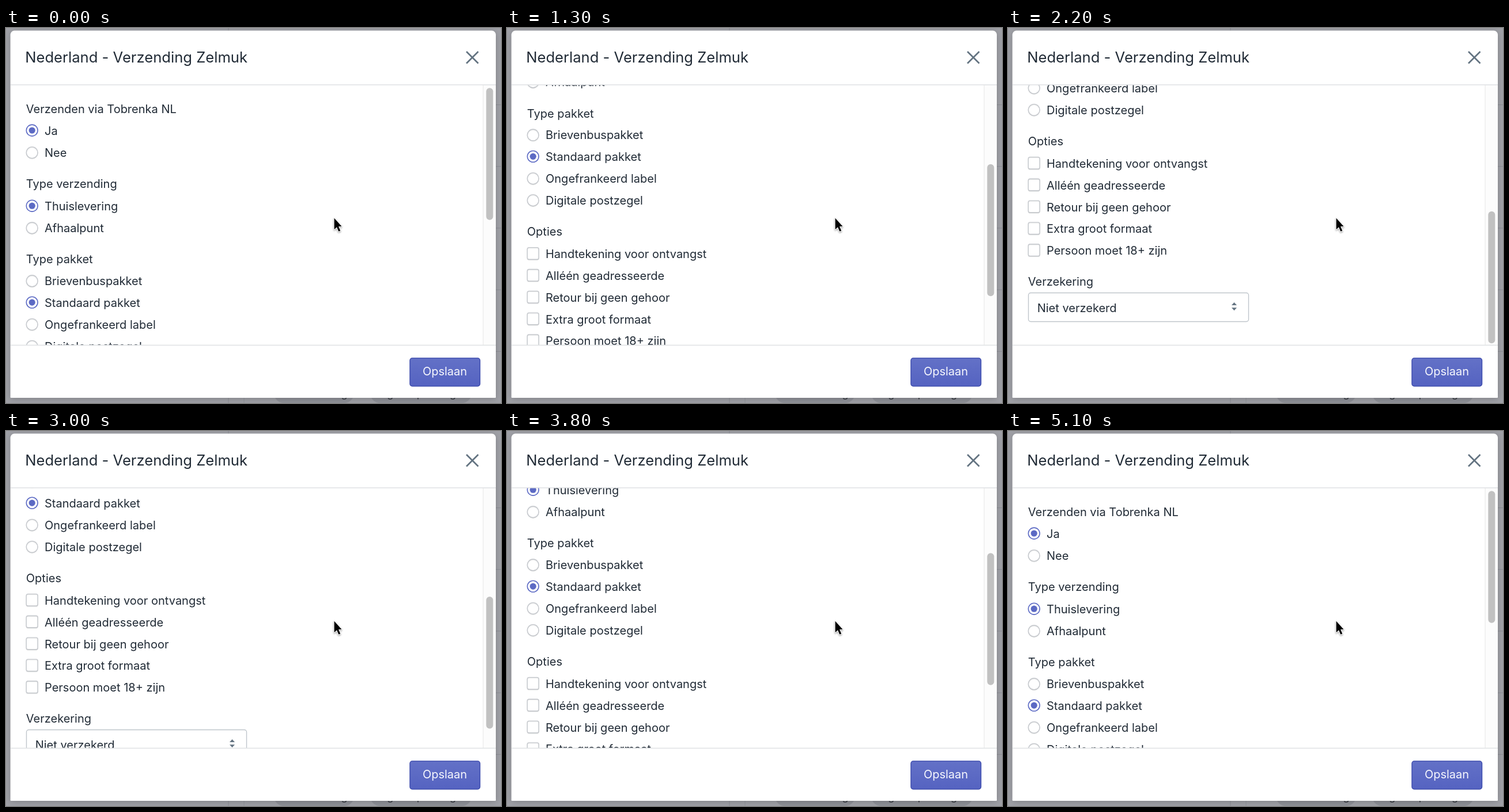
An HTML page with a canvas that plays this animation: 859 px wide and 652 px high, repeating every 5.2 s.

```html
<!DOCTYPE html>
<html lang="nl">
<head>
<meta charset="utf-8">
<title>Verzending</title>
<style>
html, body { margin: 0; width: 100%; height: 100%; overflow: hidden; background: #9d9fa6; }
canvas { display: block; width: 859px; height: 652px; }
</style>
</head>
<body>
<canvas id="stage" width="859" height="652"></canvas>
<script>
const ctx = document.getElementById('stage').getContext('2d');
const LOOP = 5200, STEP = 100;
const INK = '#212b36', INDIGO = '#5c6ac4', BORDER = '#c6c9ce', SLATE = '#637381';
const VIEW = { top: 99, bottom: 551 };

// [step, scroll offset]
const KEYS = [[0, 0], [1, 14], [8, 166], [18, 341.5], [22, 411], [26, 411], [27, 403],
  [30, 352], [38, 207], [43, 119.5], [49, 17], [50, 4], [51, 0]];

// [kind, label, vertical centre]
const ROWS = [
  ['title', 'Verzenden via Tobrenka NL', 141],
  ['on', 'Ja', 178.5],
  ['off', 'Nee', 216.5],
  ['title', 'Type verzending', 271],
  ['on', 'Thuislevering', 309.7],
  ['off', 'Afhaalpunt', 347.6],
  ['title', 'Type pakket', 402],
  ['off', 'Brievenbuspakket', 439.7],
  ['on', 'Standaard pakket', 477.6],
  ['off', 'Ongefrankeerd label', 515.3],
  ['off', 'Digitale postzegel', 553.3],
  ['title', 'Opties', 607.3],
  ['box', 'Handtekening voor ontvangst', 646.4],
  ['box', 'Alléén geadresseerde', 684.2],
  ['box', 'Retour bij geen gehoor', 722.1],
  ['box', 'Extra groot formaat', 759.9],
  ['box', 'Persoon moet 18+ zijn', 797.8],
  ['title', 'Verzekering', 852],
  ['select', 'Niet verzekerd', 896.5]
];

function scrollAt(step) {
  const i = Math.max(1, KEYS.findIndex(k => k[0] >= step));
  const [a, from] = KEYS[i - 1], [b, to] = KEYS[i];
  return from + (to - from) * (step - a) / (b - a);
}

function text(str, x, y, size = 20, color = INK, align = 'left') {
  ctx.font = `${size}px Inter, "Liberation Sans", sans-serif`;
  ctx.textAlign = align;
  ctx.fillStyle = color;
  ctx.fillText(str, x, y);
}

function line(x1, y1, x2, y2, color, width = 1) {
  ctx.beginPath();
  ctx.moveTo(x1, y1);
  ctx.lineTo(x2, y2);
  ctx.strokeStyle = color;
  ctx.lineWidth = width;
  ctx.stroke();
}

function paint(fill, stroke, width = 1.4) {
  if (fill) { ctx.fillStyle = fill; ctx.fill(); }
  if (stroke) { ctx.strokeStyle = stroke; ctx.lineWidth = width; ctx.stroke(); }
}

function rounded(x, y, w, h, r, fill, stroke, width) {
  ctx.beginPath();
  ctx.roundRect(x, y, w, h, r);
  paint(fill, stroke, width);
}

function circle(x, y, r, fill, stroke, width) {
  ctx.beginPath();
  ctx.arc(x, y, r, 0, Math.PI * 2);
  paint(fill, stroke, width);
}

function polygon(points, fill, stroke, width) {
  ctx.beginPath();
  points.forEach(([x, y]) => ctx.lineTo(x, y));
  ctx.closePath();
  paint(fill, stroke, width);
}

function shadow(color, blur, dy, draw) {
  ctx.save();
  ctx.shadowColor = color;
  ctx.shadowBlur = blur;
  ctx.shadowOffsetY = dy;
  draw();
  ctx.restore();
}

function backdrop() {
  ctx.fillStyle = '#a0a1a7';
  ctx.fillRect(0, 0, 859, 652);
  line(386, 0, 386, 652, '#8b8d94');
  line(413, 640, 413, 652, '#92949a');
  for (let i = 0; i < 5; i++) line(846, 133.5 + i * 107.2, 859, 133.5 + i * 107.2, '#8b8d94');
  rounded(465, 618, 139, 34, 17, '#8f9198');
  rounded(632, 618, 176, 34, 17, '#8f9198');
  text('Thuislevering', 478, 642, 18, '#33363d');
  text('Digitale postzegel', 644, 642, 18, '#33363d');
}

function control(kind, y) {
  if (kind === 'on') {
    circle(45.2, y - 0.5, 9.9, '#fff', INDIGO, 1.6);
    circle(45.2, y - 0.5, 5.6, INDIGO);
    return;
  }
  shadow('rgba(22,29,37,.12)', 0, 1, () => {
    if (kind === 'box') rounded(35.2, y - 11, 20, 20.6, 3, '#fff', BORDER);
    else circle(45.2, y, 9.9, '#fff', BORDER);
  });
}

function select(label, y) {
  rounded(35.5, y - 25, 382, 50, 4, '#fff', '#bfc5cb');
  text(label, 50.7, y + 8);
  polygon([[388, y - 3.5], [392.5, y - 8.5], [397, y - 3.5]], SLATE);
  polygon([[388, y + 0.7], [392.5, y + 5.7], [397, y + 0.7]], SLATE);
}

function form(offset) {
  ctx.save();
  ctx.beginPath();
  ctx.rect(8, VIEW.top, 820, VIEW.bottom - VIEW.top);
  ctx.clip();
  for (const [kind, label, centre] of ROWS) {
    const y = centre - offset;
    if (y < 60 || y > 590) continue;
    if (kind === 'title') {
      text(label, 34.8, y + 7.3);
    } else if (kind === 'select') {
      select(label, y);
    } else {
      control(kind, y);
      text(label, 67, y + 7.4);
    }
  }
  ctx.restore();
}

function scrollbar(offset) {
  ctx.fillStyle = '#fcfcfc';
  ctx.fillRect(828, VIEW.top, 22, VIEW.bottom - VIEW.top);
  line(828, VIEW.top, 828, VIEW.bottom, '#e6e6e6');
  rounded(833.3, 104.2 + offset * 0.522, 12, 229.5, 6, '#c1c1c1');
}

function frameParts() {
  text('Nederland - Verzending Zelmuk', 33.2, 60.2, 25.6);
  line(799, 41, 819.5, 61.5, SLATE, 2.6);
  line(819.5, 41, 799, 61.5, SLATE, 2.6);
  line(8, 98.7, 850, 98.7, '#dfe1e4', 1.4);
  line(8, 551.5, 850, 551.5, '#dfe1e4', 1.4);
  const fill = ctx.createLinearGradient(0, 574, 0, 623);
  fill.addColorStop(0, '#6371c7');
  fill.addColorStop(1, '#5563c1');
  rounded(701, 574, 121.5, 48.7, 4, fill, '#3f4eae', 1.5);
  text('Opslaan', 761.5, 604.2, 20, '#f6f7fd', 'center');
}

function pointer() {
  const arrow = [[569.6, 330.6], [569.6, 350.3], [574, 346.2], [577.2, 353.8],
    [580.3, 352.5], [577.1, 345], [582.6, 345]];
  ctx.lineJoin = 'round';
  shadow('rgba(0,0,0,.28)', 3, 1.5, () => polygon(arrow, '#fff', '#fff', 2.2));
  polygon(arrow, '#000');
}

function draw(time) {
  const offset = scrollAt(Math.floor((time % LOOP) / STEP));
  backdrop();
  shadow('rgba(0,0,0,.2)', 12, 2, () => rounded(7.6, 4.6, 842.4, 638.4, [7, 7, 1, 1], '#fff'));
  form(offset);
  scrollbar(offset);
  frameParts();
  pointer();
}

const start = performance.now();
function tick() {
  draw(performance.now() - start);
  requestAnimationFrame(tick);
}
tick();
</script>
</body>
</html>
```
